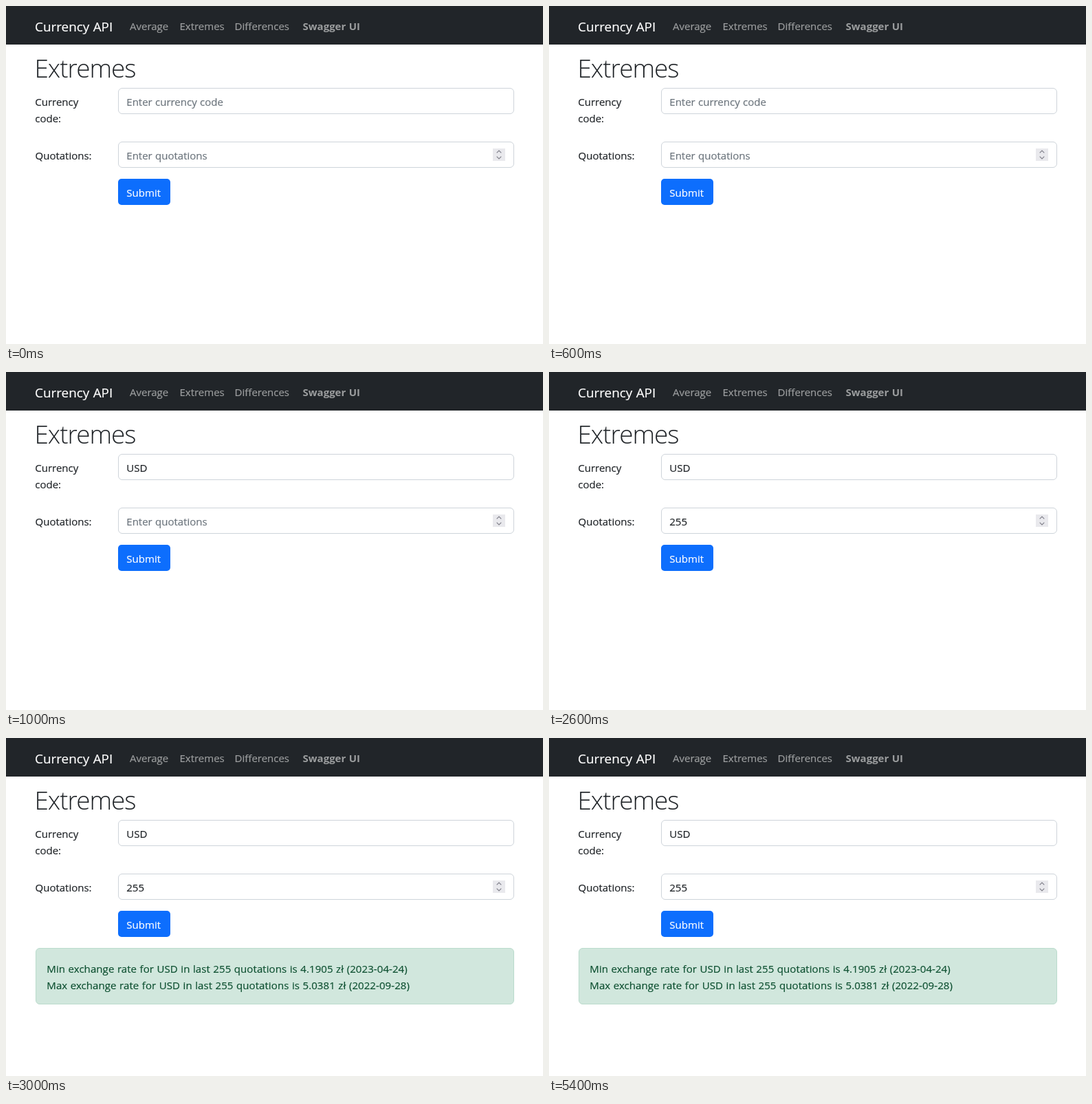
An HTML page for the animation above (7000 ms loop, 781x491 px).

```html
<!DOCTYPE html>
<html lang="en">
<head>
<meta charset="utf-8">
<title>Currency API</title>
<style>
  html, body { margin: 0; width: 100%; height: 100%; overflow: hidden; background: #fff; }
  svg { display: block; }
  text {
    font: 15px "Open Sans", "Noto Sans", sans-serif;
    word-spacing: .5px;
    color: #212529;
    fill: currentColor;
    stroke: currentColor;
    stroke-width: .2px;
  }
  .nav text { color: #9b9d9e; }
  .nav .brand { font-size: 18.9px; color: #fff; }
  .nav .strong { font-weight: 700; stroke: none; }
  .title { font-size: 37px; font-weight: 300; letter-spacing: -1.05px; stroke: none; }
  .field { fill: #fff; stroke: #ced4da; }
  .hint { color: #6c757d; }
  .button { color: #fff; }
  .alert rect { fill: #d1e7dd; stroke: #badbcc; }
  .alert text { color: #0f5132; letter-spacing: .08px; }
</style>
</head>
<body>
<svg width="781" height="491" viewBox="0 0 781 491">
  <rect width="781" height="491" fill="#fff"/>
  <g class="nav">
    <rect width="781" height="56" fill="#212529"/>
    <text class="brand" x="42" y="37">Currency API</text>
    <text x="180" y="35">Average</text>
    <text x="252.5" y="35">Extremes</text>
    <text x="332.5" y="35">Differences</text>
    <text class="strong" x="431.5" y="35">Swagger UI</text>
  </g>

  <text class="title" x="41.5" y="104">Extremes</text>
  <text x="42.3" y="145">Currency</text>
  <text x="42.3" y="169">code:</text>
  <text x="42.5" y="223">Quotations:</text>

  <rect class="field" x="163.5" y="119.5" width="575" height="37" rx="5.5"/>
  <rect class="field" x="163.5" y="197.5" width="575" height="37" rx="5.5"/>
  <text id="code" x="175.3" y="145"></text>
  <text id="count" x="175.3" y="223"></text>

  <rect x="708" y="207" width="18" height="18" fill="#e9e9ed"/>
  <path d="M713.7 213.3l3.3-3.3 3.3 3.3M713.7 218.7l3.3 3.3 3.3-3.3" fill="none" stroke="#7d7d87" stroke-width="1.1"/>

  <rect x="163" y="251" width="76" height="38" rx="5" fill="#0d6efd"/>
  <text class="button" x="175.3" y="277">Submit</text>

  <g class="alert" id="result">
    <rect x="43.5" y="305.5" width="695" height="81" rx="5.5"/>
    <text x="59.3" y="341">Min exchange rate for USD in last 255 quotations is 4.1905 zł (2023-04-24)</text>
    <text x="59.3" y="365">Max exchange rate for USD in last 255 quotations is 5.0381 zł (2022-09-28)</text>
  </g>
</svg>
<script>
  const LOOP = 7000;
  const byId = id => document.getElementById(id);
  const code = byId("code"), count = byId("count"), result = byId("result");

  function fill(field, filled, value, hint) {
    field.textContent = filled ? value : hint;
    field.setAttribute("class", filled ? "" : "hint");
  }

  function draw(t) {
    fill(code, t >= 1000, "USD", "Enter currency code");
    fill(count, t >= 2000, "255", "Enter quotations");
    result.setAttribute("visibility", t >= 3000 ? "visible" : "hidden");
  }

  const start = performance.now();
  function tick() {
    draw((performance.now() - start) % LOOP);
    requestAnimationFrame(tick);
  }
  tick();
</script>
</body>
</html>
```
